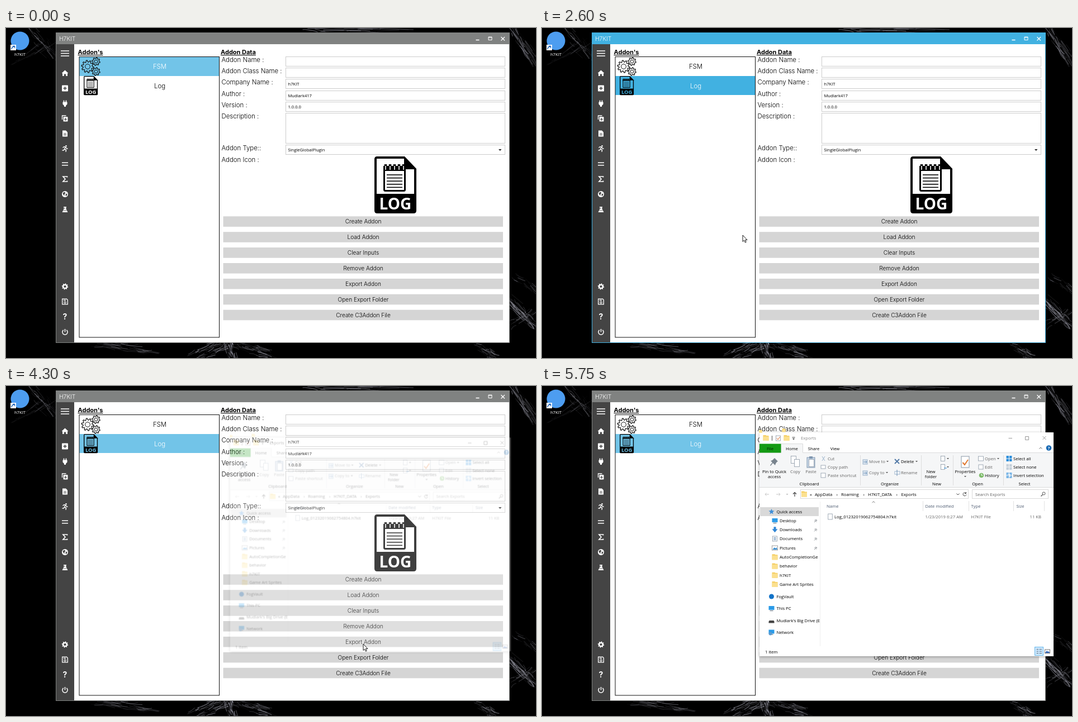
An HTML page that plays this animation: 948 by 591 pixels, repeating every 5800 ms.

```html
<!DOCTYPE html>
<html lang="en">
<head>
<meta charset="utf-8">
<title>Addon export</title>
<style>
html, body { margin: 0; width: 100%; height: 100%; overflow: hidden; background: #000; }
svg { display: block; width: 948px; height: 591px; }
text { font: 7.7px "Open Sans", "Noto Sans", sans-serif; fill: #000; white-space: pre; }
.ui text { font: 300 11.4px Inter, sans-serif; }
.ui .head { font-weight: 700; font-size: 11px; text-decoration: underline; }
.ui .btn { font-size: 10.1px; }
.ui .val { font: 7.6px "Open Sans", "Noto Sans", sans-serif; }
.ui .log { font: 700 28px "Open Sans", sans-serif; fill: currentColor; }
.ui .bold { font-weight: 700; font-size: 14px; fill: #fff; }
.mid { text-anchor: middle; }
.end { text-anchor: end; }
.dim { fill: #666; }
</style>
</head>
<body>
<svg id="stage" viewBox="0 0 948 591"></svg>
<script>
const LOOP = 5800, STEP = 50;
const stage = document.getElementById('stage');

// Markup helpers
const T = (x, y, s, c = '', a = '') => `<text x="${x}" y="${y}" class="${c}" ${a}>${s}</text>`;
const R = (x, y, w, h, fill, a = '') => `<rect x="${x}" y="${y}" width="${w}" height="${h}" fill="${fill}" ${a}/>`;
const F = (d, fill, a = '') => `<path d="${d}" fill="${fill}" ${a}/>`;
const S = (d, color, w = 1, a = '') => `<path d="${d}" fill="none" stroke="${color}" stroke-width="${w}" ${a}/>`;
const C = (x, y, r, fill, a = '') => `<circle cx="${x}" cy="${y}" r="${r}" fill="${fill}" ${a}/>`;
const G = (x, y, body, a = '') => `<g transform="translate(${x} ${y})" ${a}>${body}</g>`;
const box = (x, y, w, h, line, fill = '#fff') => R(x + .5, y + .5, w - 1, h - 1, fill, `stroke="${line}"`);

function gear(x, y, r, teeth) {
  const pts = [];
  for (let i = 0; i < teeth * 4; i++) {
    const a = (i + .5) / (teeth * 4) * 2 * Math.PI, q = i % 4 < 2 ? r : r * .74;
    pts.push((x + q * Math.cos(a)).toFixed(2) + ',' + (y + q * Math.sin(a)).toFixed(2));
  }
  return 'M' + pts.join('L') + 'z';
}

// Desktop: short wisps scattered along a line
let seed = 7;
const rand = () => (seed = seed * 16807 % 2147483647) / 2147483647;
const jit = s => (rand() - .5) * 2 * s;

function wisps(x1, y1, x2, y2, spread, n, alpha) {
  let out = '';
  for (let i = 0; i < n; i++) {
    const u = rand() * .75, len = .1 + rand() * .25, dx = jit(spread), dy = jit(spread);
    const p = k => (x1 + (x2 - x1) * k + dx + jit(3)).toFixed(1) + ',' + (y1 + (y2 - y1) * k + dy + jit(3)).toFixed(1);
    out += S(`M${p(u)}Q${p(u + len / 2)} ${p(u + len)}`, '#dde', (.4 + rand()).toFixed(2),
      `opacity="${(alpha * rand()).toFixed(2)}"`);
  }
  return out;
}

const desktop = R(0, 0, 948, 591, '#000') +
  wisps(35, -5, 95, 60, 10, 30, .28) + wisps(0, 75, 90, 15, 8, 20, .14) + wisps(520, 4, 735, 3, 4, 24, .4) +
  wisps(150, 562, 275, 580, 7, 40, .3) + wisps(325, 595, 400, 562, 10, 50, .4) +
  wisps(395, 555, 408, 600, 8, 50, .6) + wisps(400, 562, 485, 588, 8, 50, .45) +
  wisps(835, 560, 880, 595, 6, 35, .4) + wisps(893, 480, 955, 545, 7, 60, .45) +
  wisps(895, 535, 952, 500, 6, 22, .3) + wisps(897, -8, 955, 75, 8, 50, .4) + wisps(905, 440, 955, 475, 6, 20, .3) +
  C(25, 23, 16.5, '#4d9df0') +
  R(8, 30, 10, 10, '#fff') + S('M10,38Q10,34 15,33M12,32.5H15.5V36', '#1d62b8', 1.3) +
  T(25, 49.5, 'h7KIT', 'mid', 'style="fill:#fff"');

// Application window
const line = (d, w = 1.4) => S(d, '#fff', w);
const sideIcons = [
  [45.5, line('M-7.5,-4.5H7.5M-7.5,0H7.5M-7.5,4.5H7.5', 1.3)],
  [81, F('M-6,0L0,-5.5 6,0H4.5V5H1.5V1.5H-1.5V5H-4.5V0z', '#fff')],
  [108, R(-5.5, -5.5, 11, 11, '#fff', 'rx="1"') + S('M-3,0H3M0,-3V3', '#444', 1.6)],
  [135, F('M-4,-2.5H4V1.5L1.5,4V6H-1.5V4L-4,1.5z', '#fff') + line('M-2,-5.5V-2M2,-5.5V-2', 1.6)],
  [162, line('M-5,2V-5H2', 1.3) + R(-3, -3, 8, 8.5, '#fff', 'rx="1"') + S('M1,-1V4M-1.5,1.5H3.5', '#444', 1.2)],
  [189, F('M-4.5,-5.5H1.5L4.5,-2.5V5.5H-4.5z', '#fff') + S('M-2.5,0H2.5M-2.5,2.5H2.5', '#444')],
  [216, C(2, -4.8, 1.3, '#fff') + line('M-4,-1.5L-1.5,-3.5 1.5,-2.5 3,0H5M.8,-2.5L-1,1 2,2.5 1.5,6M-1,1L-2.5,3H-5')],
  [243.5, line('M-5.5,-2.3H5.5M-5.5,2.3H5.5', 1.6)],
  [270.5, line('M4,-3V-4.5H-3.5L.5,0 -3.5,4.5H4V3', 1.7)],
  [297.5, C(0, 0, 5.5, '#fff') + F('M-4,-2L-1,-4 1,-2 -1,0 -1,3 -3,1zM1,0L4,-1 3.5,2 1.5,4z', '#444')],
  [325, F('M-2.5,-5H2.5V-3.8H2V-1L5,5H-5L-2,-1V-3.8H-2.5z', '#fff') + S('M-3,2H3M-.8,-3.5V-1', '#444', .8)],
  [463, F(gear(0, 0, 5.8, 8), '#fff') + C(0, 0, 2.1, '#444')],
  [490, line('M-4.8,-4.8H3L4.8,-3V4.8H-4.8z', 1.3) + line('M-2.5,-2.5H1.5', 1.6) + S('M-1.5,.2H1.5V3H-1.5z', '#fff')],
  [517, T(0, 5, '?', 'mid bold')],
  [544.5, line('M-2.8,-3.6A4.6,4.6 0 1 0 2.8,-3.6M0,-5.6V0', 1.5)]
].map(([y, body]) => G(105.5, y, body)).join('');

// Drawn in a 75 x 102 box; light parts follow the current text colour
const logIcon = F('M5,0H54L75,22V97Q75,102 70,102H5Q0,102 0,97V5Q0,0 5,0z', '#000') +
  F('M4,4H53V23H71V67H4z', 'currentColor') +
  R(17.5, 18.5, 37, 43, 'currentColor', 'rx="2" stroke="#000" stroke-width="3"') +
  R(16, 17, 40, 9, '#000') +
  [0, 1, 2, 3, 4].map(i => S(`M${20 + i * 8},14V23`, '#000', 4.5) +
    S(`M${20 + i * 8},17V24`, 'currentColor', 1.6) +
    S(`M22,${33 + i * 5.6}H50`, '#000', 1.6)).join('') +
  T(37.5, 95, 'LOG', 'mid log');

const cogs = [[146, 69, 11, 10], [161, 60, 7.2, 8], [161, 78, 7.2, 8]].map(([x, y, r, n]) =>
  S(gear(x, y, r, n), '#111', 1.2) + C(x, y, r * .4, 'none', 'stroke="#111"')).join('');

const fields = [
  ['Addon Name :', 51, 18, ''], ['Addon Class Name :', 71, 18, ''],
  ['Company Name :', 91, 18, 'h7KIT'], ['Author :', 112, 18, 'Mudlark417'],
  ['Version :', 132, 18, '1.0.0.0'], ['Description :', 152, 55, ''],
  ['Addon Type::', 209, 18, 'SingleGlobalPlugin']
].map(([name, y, h, value]) => T(385.5, y + 10.3, name) + box(500, y, 393, h, '#ccc') +
  T(504.5, y + 12.3, value, 'val')).join('');

const buttonNames = ['Create Addon', 'Load Addon', 'Clear Inputs', 'Remove Addon',
  'Export Addon', 'Open Export Folder', 'Create C3Addon File'];
const buttonY = i => 337.3 + i * 27.9;

const app = '<g class="ui">' +
  R(89, 8, 812, 556, '#808281', 'id="frame"') + R(122, 29, 778, 534, '#fff') + R(90, 29, 32, 534, '#444') +
  T(95, 23, 'H7KIT', '', 'style="fill:#fff;font-size:10.3px"') +
  S('M840.5,21.5H846.5', '#fff', 1.6) + S('M863,16H869V21.5H863zM863,17H869', '#fff') +
  S('M885.5,16L892,22.5M892,16L885.5,22.5', '#fff', 1.3) + sideIcons +
  T(128.5, 47, "Addon's", 'head') + T(384, 47, 'Addon Data', 'head') +
  R(131, 52, 250, 34, '#fff', 'id="row0"') + R(131, 86, 250, 34, '#fff', 'id="row1"') +
  R(131, 51.5, 250.5, 502.5, 'none', 'stroke="#111"') + cogs +
  `<g id="smallLog" transform="translate(139 86) scale(.335)">${logIcon}</g>` +
  T(275, 73, 'FSM', 'mid', 'id="name0"') + T(275, 107.5, 'Log', 'mid', 'id="name1"') +
  fields + F('M881,217H886.5L883.7,220z', '#222') + T(385.5, 240, 'Addon Icon :') +
  G(659, 230, logIcon, 'style="color:#fff"') +
  buttonNames.map((s, i) => R(388.5, buttonY(i), 500.5, 18.6, '#d5d5d5', `id="btn${i}"`) +
    T(639, buttonY(i) + 12.8, s, 'mid btn', `id="cap${i}"`)).join('') + '</g>';

// File browser
const folder = (x, y, k = 1) => G(x, y, F('M-5,-5H0L1,-4H5V5H-5z', '#f5cf66') + F('M-5,-2.5H5V5H-5z', '#fbe08f'), `style="scale:${k}"`);
const page = (x, y, w = 7, h = 9) => R(x - w / 2, y - h / 2, w, h, '#fff', 'stroke="#8a97a5" stroke-width=".8"');
const drop = (x, y, c = '#555') => F(`M${x - 2},${y - 1}H${x + 2}L${x},${y + 1.3}z`, c);
const pale = '#9bb3cc', blue = '#2e8fdc';

const ribbonText = [
  [415.5, 156, 'Pin to Quick'], [415.5, 165, 'access'], [453, 156, 'Copy', 'dim'], [481, 156, 'Paste', 'dim'],
  [695.5, 156, 'New'], [695.5, 165, 'folder'], [757, 156, 'Properties'],
  ...[[478, 'Clipboard'], [622, 'Organize'], [706, 'New'], [779, 'Open'], [863, 'Select']]
    .map(([x, s]) => [x, 178, s])
].map(([x, y, s, c = '']) => T(x, y, s, 'mid ' + c)).join('') + [
  [511, 133, 'Cut', 'dim'], [511, 148, 'Copy path', 'dim'], [511, 163, 'Paste shortcut', 'dim'],
  [585, 138, 'Move to', 'dim'], [585, 158, 'Copy to', 'dim'], [642, 138, 'Delete'], [642, 158, 'Rename', 'dim'],
  [792, 133, 'Open', 'dim'], [792, 148, 'Edit', 'dim'], [792, 163, 'History'],
  [843, 133, 'Select all'], [843, 148, 'Select none'], [843, 163, 'Invert selection']
].map(a => T(...a)).join('');

const grid = (y, c) => [0, 1, 2, 3].map(i => R(830.5 + i % 2 * 5.5, y - 5 + (i >> 1) * 5.5, 4.5, 4.5, c)).join('');
const ribbonIcons =
  F('M416,129L422,135 420,136 418,139 417,142 413,138 409,143 408,142 412,137 409,134 412,133z', '#78838d') +
  page(450, 132, 9, 13) + page(456, 138, 9, 13) +
  R(474, 128, 14, 18, '#c8d6e6', 'stroke="#8097b0"') + R(478, 126, 6, 4, '#8097b0') + page(482, 138, 9, 13) +
  S('M501,126L506,134M506,126L501,134', pale) + page(503, 145, 8, 6) + page(503, 160, 8, 8) +
  [136, 156].map(y => R(574, y - 4, 8, 8, '#dce5ee', `stroke="${pale}"`) + S(`M575,${y}H581L579,${y - 2}M581,${y}L579,${y + 2}`, '#6d93bb')).join('') +
  S('M631,131L639,139M639,131L631,139', '#4f77a5', 1.8) + R(631, 153, 9, 5, '#fff', `stroke="${pale}"`) + S('M635,150V161', '#688cb0') +
  folder(695, 136, 1.4) + page(717, 130) + folder(721, 132, .6) + page(717, 145) + S('M719,147H724', blue) +
  R(750, 126, 14, 20, '#fff', 'stroke="#8a97a5"') + S('M752.5,137L756,141 762,132', '#e07830', 2) +
  page(785, 130, 9, 8) + page(785, 145, 8, 8) + C(786, 160, 4.3, '#7dbb6a') + S('M786,157V160H788.5', '#fff') + folder(782, 162, .5) +
  grid(130, blue) + grid(145, '#c5d0da') + grid(160, '#79b5e6') + S('M833,158H837V163', '#fff', 1.2) +
  [[618, 135], [617, 155], [670, 135], [726, 130], [726, 145], [757, 162], [816, 130]].map(p => drop(...p)).join('') +
  S('M569.5,124V178M678.5,124V178M735.5,124V178M825.5,124V178', '#ddd');

const screen = (x, y) => R(x - 5, y - 4, 10, 7, '#2b9be8') + S(`M${x - 3},${y + 4.5}H${x + 3}`, '#567');
const navIcons = {
  star: (x, y) => F(`M${x},${y - 5}l1.4,3.3 3.6,.3 -2.8,2.3 .9,3.6 -3.1,-2 -3.1,2 .9,-3.6 -2.8,-2.3 3.6,-.3z`, '#3f8fd8'),
  screen, folder,
  down: (x, y) => F(`M${x - 2},${y - 5}h4v4h3l-5,6 -5,-6h3z`, '#2f86d6'),
  doc: (x, y) => page(x, y, 8, 9) + S(`M${x - 2},${y - 2}h4m-4,2h4m-4,2h4`, '#5b88b5'),
  image: (x, y) => R(x - 5, y - 4, 10, 8, '#fff', 'stroke="#888" stroke-width=".8"') + F(`M${x - 4},${y + 3}l3,-4 2,2 2,-2 1.5,4z`, '#3b8ed0'),
  dot: (x, y) => C(x, y, 4.5, '#1273c8'),
  drive: (x, y) => F(`M${x - 4},${y}h8l1,2v2.5h-10v-2.5z`, '#444'),
  net: (x, y) => screen(x, y - 1) + C(x - 2, y + 2, 3, '#5a9bd0')
};
const nav = [
  [225, 'Quick access', 'star'], [241, 'Desktop', 'screen', 1], [257.3, 'Downloads', 'down', 1],
  [273.5, 'Documents', 'doc', 1], [290, 'Pictures', 'image', 1], [306.3, 'AutoCompletionGe', 'folder', 2],
  [322.5, 'behavior', 'folder', 2], [338.7, 'h7KIT', 'folder', 2], [355, 'Game Art Sprites', 'folder', 2],
  [377, 'FogVault', 'dot'], [398, 'This PC', 'screen'], [420, "Mudlark's Big Drive (E", 'drive'], [441.5, 'Network', 'net']
].map(([y, s, icon, depth]) => navIcons[icon](depth ? 416.5 : 410.5, y) + T(depth ? 425 : 419.5, y + 2.8, s) +
  (depth === 1 ? S(`M487,${y + 3}l2,-2m-1.5,-2l3.5,3.5m-2.5,-4.5l3,3m-1.5,-3l2,2`, '#8a8f94') : '')).join('');

const crumbs = [[479, '«'], [488, 'AppData'], [526.5, '›'], [535, 'Roaming'], [574.5, '›'],
  [583, 'H7KIT_DATA'], [633.5, '›'], [642.5, 'Exports']].map(([x, s]) => T(x, 196.7, s)).join('');

const browser =
  R(389, 83, 526, 401, '#fff', 'id="shade"') +
  R(389, 120, 526, 61, '#f5f6f7') + S('M389,119.5H427.5V103.5H466.5V119.5H915M389,181.5H915', '#dadbdc') +
  R(428, 104, 38, 17, '#f5f6f7') + R(389, 103.5, 38.5, 16, '#149a14') +
  folder(400.5, 93) + S('M411.5,89V98', '#555') + page(422.5, 93.5, 8, 9) + S('M420,93.5L422,96 425.5,91', '#d86a2a') +
  folder(437.5, 93) + S('M447.5,92H452.5', '#333') + drop(450, 95, '#333') + T(463, 96.3, 'Exports', '', 'id="caption"') +
  '<g id="controls">' + S('M834.5,93.5H841M864.5,90.5H870.5V96.5H864.5zM895.5,90L901.5,96M901.5,90L895.5,96', 'currentColor') + '</g>' +
  T(408, 114.5, 'File', 'mid', 'style="fill:#052405"') + T(447, 114.5, 'Home', 'mid') + T(486, 114.5, 'Share', 'mid') + T(524, 114.5, 'View', 'mid') +
  S('M889.5,112.5L892,110 894.5,112.5', '#666') + C(906.5, 111, 4.8, '#1668b3') +
  T(906.5, 113.8, '?', 'mid', 'style="fill:#fff;font-weight:700"') +
  ribbonIcons + ribbonText +
  S('M406,194H399M401.5,191.5L399,194 401.5,196.5M419,194H426M423.5,191.5L426,194 423.5,196.5', '#c5c5c5') + drop(438.5, 194, '#bbb') +
  S('M452,198V190.5M449,193.5L452,190.5 455,193.5', '#444', 1.2) +
  box(462, 185, 301, 17, '#d9d9d9') + box(769, 185, 137, 17, '#d9d9d9') + folder(469, 193.5) + crumbs +
  S('M741.5,192.5L744,195 746.5,192.5', '#444') + S('M758,191.5A3,3 0 1 0 759,194.5M758.5,190V192.5H756', '#444') +
  T(775, 196.7, 'Search Exports', 'dim') + C(897.5, 192.5, 2.5, 'none', 'stroke="#555"') + S('M895.5,194.5L892.5,197.5', '#555', 1.3) +
  R(390, 217, 105, 16, '#d9d9d9') + nav + S('M497.5,207V466', '#f0f0f0') +
  S('M681.5,206V224M763.5,206V224M843.5,206V224M898.5,206V224', '#e2e2e2') + S('M590.5,209L593,206.7 595.5,209', '#777') +
  [[509, 'Name'], [685.5, 'Date modified'], [767.5, 'Type'], [848.5, 'Size']].map(([x, s]) => T(x, 217.5, s, '', 'style="fill:#4c5a70"')).join('') +
  R(507, 227, 389, 16, '#e5f3ff', 'id="fileRow"') + page(515.5, 234, 7.5, 10) + T(523, 237, 'Log_01232019062754804.h7kit') +
  T(685.5, 237, '1/23/2019 6:27 AM', 'dim') + T(767.5, 237, 'H7KIT File', 'dim') + T(893, 237, '11 KB', 'end dim') +
  T(399, 478.5, '1 item') + box(881, 467, 16, 16, '#66b5e8', '#cce8ff') +
  S('M884.5,471.5H888M884.5,475H888M884.5,478.5H888M889.5,471.5H894M889.5,475H894M889.5,478.5H894', '#567') +
  R(899.5, 472, 9, 6.5, '#fff', 'stroke="#777"') + F('M900,478l3,-4 2,2 1.5,-1 1.5,3z', '#36b');

const tooltip = R(551, 256, 130, 33, '#000', 'opacity=".3"') + box(549, 254, 130, 33, '#666') +
  ['Type: H7KIT File', 'Size: 10.6 KB', 'Date modified: 1/23/2019 6:27 AM']
    .map((s, i) => T(553, 263.2 + i * 10.1, s, '', 'style="fill:#444"')).join('');

stage.innerHTML = desktop + app + `<g id="browser">${browser}</g><g id="tip">${tooltip}</g>` +
  C(0, 0, 8.3, 'rgba(220,220,0,.62)', 'id="click"') +
  `<g id="cursor">${F('M0,0V11.5L2.6,9.2 4.4,13.2 6.2,12.4 4.5,8.5H8z', '#fff', 'stroke="#000" stroke-width=".9"')}</g>`;

const el = {};
stage.querySelectorAll('[id]').forEach(n => el[n.id] = n);
const show = (node, on) => node.style.display = on ? '' : 'none';

// Pointer path: time, x, y, ease-out power
const path = [[750, 547, 551], [850, 395, 525], [1300, 250, 108, 1.6], [2150, 250, 108], [2600, 359, 371],
  [2750, 470, 442], [3250, 639, 462, 1.6], [4600, 639, 462], [4650, 549, 234], [4750, 549, 234],
  [4800, 559, 261], [5350, 902, 577], [5500, 916, 592]];

function pointer(t) {
  const i = path.findIndex(k => k[0] > t);
  if (i < 1) return [-50, -50];
  const [t0, x0, y0] = path[i - 1], [t1, x1, y1, pow = 1] = path[i];
  const u = 1 - (1 - (t - t0) / (t1 - t0)) ** pow;
  return [x0 + (x1 - x0) * u, y0 + (y1 - y0) * u];
}

function draw(t) {
  const [x, y] = pointer(t);
  const over = (l, top, w, h) => x >= l && x < l + w && y >= top && y < top + h;
  const active = t >= 1600 && t < 4150, picked = t >= 1600;
  el.cursor.setAttribute('transform', `translate(${x} ${y})`);
  el.click.setAttribute('transform', `translate(${x - .3} ${y - .3})`);
  show(el.click, t === 1600 || t === 4050);
  el.frame.setAttribute('fill', active ? '#41b1e1' : '#808281');

  const chosen = picked && t < 4050 ? '#41b1e1' : '#72c4e8';
  const logFill = picked ? chosen : over(131, 86, 250, 34) ? '#a0d8f0' : '#fff';
  el.row0.setAttribute('fill', picked ? '#fff' : chosen);
  el.row1.setAttribute('fill', logFill);
  el.smallLog.style.color = logFill;
  el.name0.style.fill = picked ? '#000' : '#fff';
  el.name1.style.fill = picked ? '#fff' : '#000';

  buttonNames.forEach((_, i) => {
    const hot = over(388.5, buttonY(i), 500.5, 18.6) && (t < 4300 || y > 484);
    const down = hot && t === 4050;
    el['btn' + i].setAttribute('fill', down ? '#222' : hot ? '#e0e0e0' : '#d5d5d5');
    el['cap' + i].style.fill = down ? '#fff' : '#000';
  });

  const open = Math.min(1, Math.max(0, (t - 4250) / 250));
  const k = 1 - .07 * (1 - open) ** 2, focus = t < 5750;
  show(el.browser, open > 0);
  el.browser.setAttribute('opacity', Math.min(1, open * 1.25));
  el.browser.setAttribute('transform', `translate(651.5 283.5) scale(${k}) translate(-651.5 -283.5)`);
  el.shade.style.filter = `drop-shadow(0 1px ${focus ? 3 : 2}px rgba(0,0,0,${focus ? .5 : .35}))`;
  el.caption.style.fill = focus ? '#000' : '#888';
  el.controls.style.color = focus ? '#222' : '#999';
  show(el.fileRow, over(507, 227, 389, 16));
  show(el.tip, t >= 4800 && t < 4900);
}

function tick() {
  draw(Math.floor(performance.now() % LOOP / STEP) * STEP);
  requestAnimationFrame(tick);
}
tick();
</script>
</body>
</html>
```
